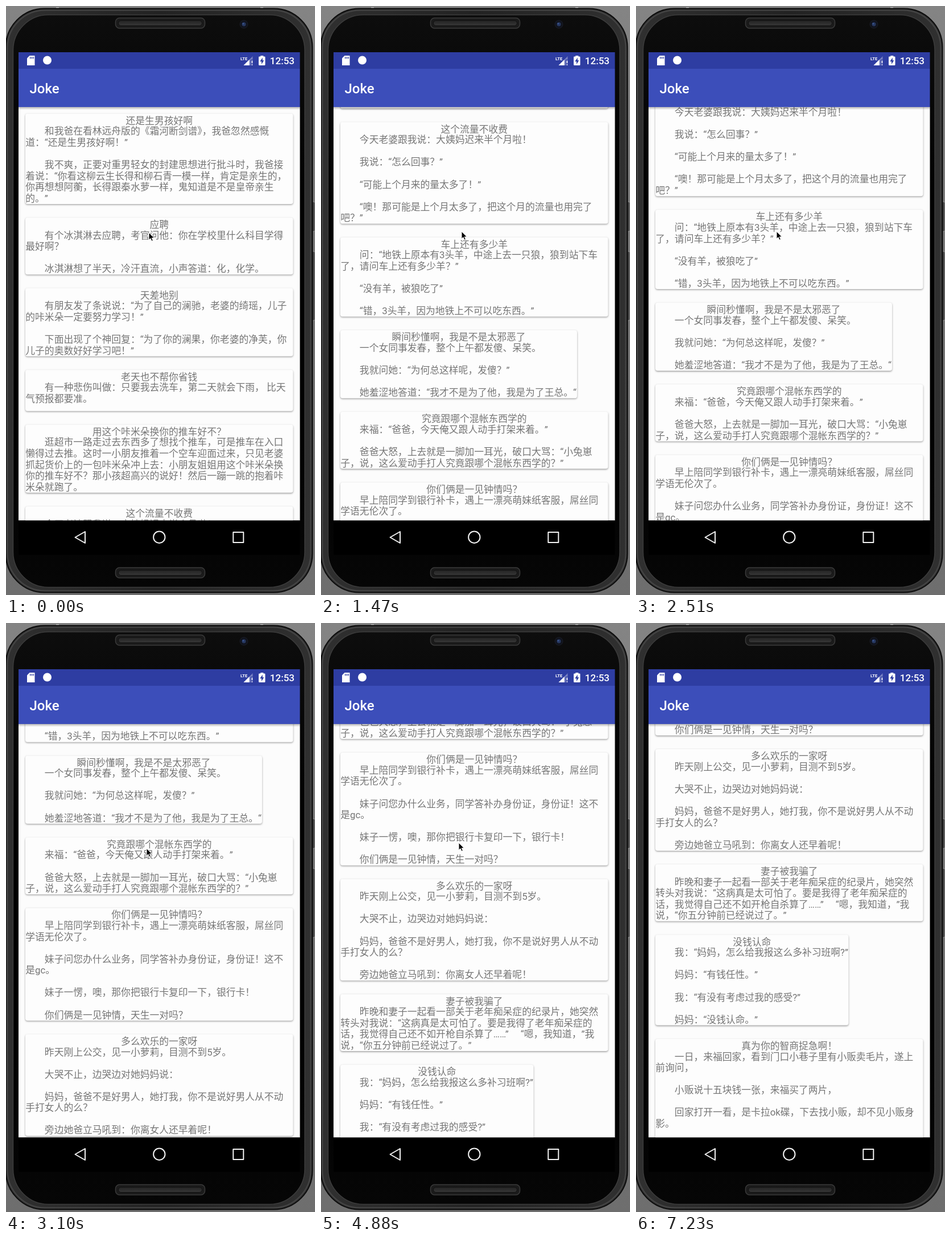
Recreate the animation shown at these times as an HTML page with a canvas. Size 543 by 1032 pixels, loop 7680 ms.

```html
<!DOCTYPE html>
<html lang="zh-CN">
<head>
<meta charset="utf-8">
<title>Joke</title>
<style>
html, body { margin: 0; width: 543px; height: 1032px; overflow: hidden; background: #7a7a7a; }
canvas { display: block; }
</style>
</head>
<body>
<canvas id="stage" width="543" height="1032"></canvas>
<script>
const ctx = document.getElementById('stage').getContext('2d');
const LOOP = 7680, STEP = 147.6;
const LINE = 19.57, CARD_PAD = 21.5, GAP = 23.8;
const LEFT = 34, FULL_WIDTH = 470.5, FIRST_TOP = 188.5;
const SANS = "Roboto, 'Noto Sans CJK SC', 'Noto Sans CJK', sans-serif";

// Each card: title line, then body lines.
const cards = [
`还是生男孩好啊
　　和我爸在看林远舟版的《霜河断剑谱》，我爸忽然感慨
道：“还是生男孩好啊！”

　　我不爽，正要对重男轻女的封建思想进行批斗时，我爸接
着说：“你看这柳云生长得和柳石青一模一样，肯定是亲生的，
你再想想阿蘅，长得跟秦水萝一样，鬼知道是不是皇帝亲生
的。”`,
`应聘
　　有个冰淇淋去应聘，考官问他：你在学校里什么科目学得
最好啊？

　　冰淇淋想了半天，冷汗直流，小声答道：化，化学。`,
`天差地别
　　有朋友发了条说说：“为了自己的澜驰，老婆的绮瑶，儿子
的咔米朵一定要努力学习！”

　　下面出现了个神回复：“为了你的澜果，你老婆的净芙，你
儿子的奥数好好学习吧！”`,
`老天也不帮你省钱
　　有一种悲伤叫做：只要我去洗车，第二天就会下雨， 比天
气预报都要准。`,
`用这个咔米朵换你的推车好不？
　　逛超市一路走过去东西多了想找个推车，可是推车在入口
懒得过去推。这时一小朋友推着一个空车迎面过来，只见老婆
抓起货价上的一包咔米朵冲上去：小朋友姐姐用这个咔米朵换
你的推车好不？那小孩超高兴的说好！然后一蹦一跳的抱着咔
米朵就跑了。`,
`这个流量不收费
　　今天老婆跟我说：大姨妈迟来半个月啦！

　　我说：“怎么回事？”

　　“可能上个月来的量太多了！”

　　“噢！那可能是上个月太多了，把这个月的流量也用完了
吧？”`,
`车上还有多少羊
　　问：“地铁上原本有3头羊，中途上去一只狼，狼到站下车
了，请问车上还有多少羊？”

　　“没有羊，被狼吃了”

　　“错，3头羊，因为地铁上不可以吃东西。”`,
`瞬间秒懂啊，我是不是太邪恶了
　　一个女同事发春，整个上午都发傻、呆笑。

　　我就问她：“为何总这样呢，发傻？”

　　她羞涩地答道：“我才不是为了他，我是为了王总。“`,
`究竟跟哪个混帐东西学的
　　来福：“爸爸，今天俺又跟人动手打架来着。”

　　爸爸大怒，上去就是一脚加一耳光，破口大骂：“小兔崽
子，说，这么爱动手打人究竟跟哪个混帐东西学的？”`,
`你们俩是一见钟情吗？
　　早上陪同学到银行补卡，遇上一漂亮萌妹纸客服，屌丝同
学语无伦次了。

　　妹子问您办什么业务，同学答补办身份证，身份证！这不
是gc。

　　妹子一愣，噢，那你把银行卡复印一下，银行卡！

　　你们俩是一见钟情，天生一对吗？`,
`多么欢乐的一家呀
　　昨天刚上公交，见一小萝莉，目测不到5岁。

　　大哭不止，边哭边对她妈妈说：

　　妈妈，爸爸不是好男人，她打我，你不是说好男人从不动
手打女人的么？

　　旁边她爸立马吼到：你离女人还早着呢！`,
`妻子被我骗了
　　昨晚和妻子一起看一部关于老年痴呆症的纪录片，她突然
转头对我说：“这病真是太可怕了。要是我得了老年痴呆症的
话，我觉得自己还不如开枪自杀算了……”　 “嗯，我知道，”我
说，“你五分钟前已经说过了。”`,
`没钱认命
　　我：“妈妈，怎么给我报这么多补习班啊?”

　　妈妈：“有钱任性。”

　　我：“有没有考虑过我的感受?”

　　妈妈：“没钱认命。”`,
`真为你的智商捉急啊！
　　一日，来福回家，看到门口小巷子里有小贩卖毛片，遂上
前询问，

　　小贩说十五块钱一张，来福买了两片，

　　回家打开一看，是卡拉ok碟，下去找小贩，却不见小贩身
影。

　　`
].map(text => {
  const [title, ...lines] = text.split('\n');
  return { title, lines, width: FULL_WIDTH, height: lines.length * LINE + CARD_PAD };
});
cards[3].height = 72.2;
cards[7].width = 416;
cards[12].width = 339.5;
cards.reduce((top, card) => (card.top = top) + card.height + GAP, FIRST_TOP);

// Flings: start step, end step, start offset, end offset, ease-out power.
const flings = [
  [0, 17, 0, 721.5, 3.05],
  [18, 34, 721.5, 1281, 3.47],
  [34, 42, 1281, 1436.5, 3],
  [42, 46, 1436.5, 1508.5, 2]
];

function scrollAt(step) {
  const [s0, s1, y0, y1, power] = flings.findLast(f => step >= f[0]);
  const p = Math.min(1, (step - s0) / (s1 - s0));
  return y0 + (y1 - y0) * (1 - (1 - p) ** power);
}

function cursorAt(step) {
  if (step < 1) return [251, 397];
  if (step < 30) return [247, 395];
  if (step < 45) return [242, 385];
  if (step === 45) return [533, 700];
  return step === 48 ? [519, 1030.5] : null;
}

function rect(x, y, w, h, color) {
  ctx.fillStyle = color;
  ctx.fillRect(x, y, w, h);
}

function round(x, y, w, h, r, fill, stroke, lineWidth = 1) {
  ctx.beginPath();
  ctx.roundRect(x, y, w, h, r);
  paint(fill, stroke, lineWidth);
}

function poly(points, fill, stroke, lineWidth) {
  ctx.beginPath();
  points.forEach(([x, y]) => ctx.lineTo(x, y));
  ctx.closePath();
  paint(fill, stroke, lineWidth);
}

function disc(x, y, r, fill, stroke, lineWidth) {
  ctx.beginPath();
  ctx.arc(x, y, r, 0, Math.PI * 2);
  paint(fill, stroke, lineWidth);
}

function paint(fill, stroke, lineWidth) {
  if (fill) { ctx.fillStyle = fill; ctx.fill(); }
  if (stroke) { ctx.strokeStyle = stroke; ctx.lineWidth = lineWidth; ctx.stroke(); }
}

function gradient(x0, y0, x1, y1, ...colors) {
  const g = ctx.createLinearGradient(x0, y0, x1, y1);
  colors.forEach((c, i) => g.addColorStop(i / (colors.length - 1), c));
  return g;
}

function label(text, x, y, font, color, align = 'left') {
  ctx.font = font;
  ctx.textAlign = align;
  ctx.fillStyle = color;
  ctx.fillText(text, x, y);
}

function drawSpeaker(y) {
  round(192.5, y, 157, 18, 7, '#1b1b1b', '#3a3a3a', 1.5);
  round(197.5, y + 4.5, 147, 9, 4.5, gradient(0, y + 4, 0, y + 14, '#222', '#383838'), '#101010');
}

function drawPhone() {
  rect(0, 0, 543, 1032, gradient(0, 0, 0, 1032, '#848484', '#787878', '#6e6e6e'));
  round(537, 343, 6, 52, 2, '#4a4a4a', '#a0a0a0');
  round(537, 430, 6, 121, 2, '#4a4a4a', '#a0a0a0');
  rect(88, 2, 5, 3, '#bbb');
  rect(447, 2, 5, 3, '#bbb');
  round(-0.5, 4.5, 539, 1023, 68, gradient(0, 0, 539, 0, '#303030', '#222', '#303030'), '#0c0c0c', 2);
  round(2.5, 7.5, 533, 1017, 66, null, '#454545', 2);
  round(12.5, 15.5, 512.5, 1003, 62, gradient(0, 15, 0, 1018, '#0d0d0d', '#000', '#000', '#060606'), '#3c3c3c', 1.5);
  drawSpeaker(21);
  drawSpeaker(984);
  disc(418, 32, 7, '#10131c', '#1b1e28', 1);
  disc(418, 32, 3.5, '#26375f');
  disc(416.8, 31, 1.3, '#3f5a94');
}

function drawCards(scroll) {
  ctx.save();
  ctx.beginPath();
  ctx.rect(22, 177, 494.5, 724.5);
  ctx.clip();
  rect(22, 177, 495, 725, '#fcfcfc');
  for (const { title, lines, width, height, top } of cards) {
    const y = top - scroll;
    if (y > 905 || y + height < 170) continue;
    ctx.save();
    ctx.shadowColor = 'rgba(0,0,0,.38)';
    ctx.shadowBlur = 3;
    ctx.shadowOffsetY = 1.3;
    round(LEFT, y, width, height, 4, '#fdfdfd');
    ctx.restore();
    const font = '16.8px ' + SANS;
    label(title, LEFT + width / 2, y + 18.3, font, '#757575', 'center');
    lines.forEach((line, i) => label(line, LEFT + 0.3, y + 36.9 + i * LINE, font, '#757575'));
  }
  rect(22, 177, 495, 5, gradient(0, 177, 0, 182, 'rgba(0,0,0,.28)', 'rgba(0,0,0,0)'));
  ctx.restore();
}

function drawBars() {
  const status = '#2e3da2', white = '#fff';
  rect(22, 81, 494.5, 29, status);
  rect(22, 110, 494.5, 67, '#3c4eba');
  label('Joke', 41.5, 152.5, '500 24px ' + SANS, white);
  label('12:53', 507, 102, '500 17px ' + SANS, white, 'right');
  label('LTE', 412, 95, 'bold 7.5px ' + SANS, white);

  poly([[41.5, 87], [50.5, 87], [50.5, 104], [37, 104], [37, 91.5]], white);
  [42, 44.8, 47.5].forEach(x => rect(x, 89, 1.3, 3.5, status));
  disc(72.5, 95, 7.5, white);

  poly([[417.5, 104], [433.5, 88], [433.5, 94], [430, 94], [430, 104]], 'rgba(255,255,255,.35)');
  poly([[417.5, 104], [427.5, 94], [427.5, 104]], white);
  rect(431.5, 95.5, 1.8, 5, white);
  rect(431.5, 102, 1.8, 1.8, white);

  round(444, 88.5, 11.5, 15.5, 1.2, white);
  rect(447.3, 87, 5, 2, white);
  poly([[450.8, 90.5], [446.2, 97.2], [449, 97.2], [449, 102], [453.4, 95.3], [450.8, 95.3]], status);

  rect(22, 901.5, 494.5, 60, '#000');
  ctx.lineJoin = 'round';
  poly([[121.5, 931], [139, 921], [139, 941]], null, '#f2f2f2', 2);
  disc(269.3, 930.7, 10.2, null, '#f2f2f2', 2);
  poly([[399.3, 922], [417.3, 922], [417.3, 940], [399.3, 940]], null, '#f2f2f2', 2);
}

function drawCursor([x, y]) {
  ctx.save();
  ctx.translate(x, y);
  ctx.lineJoin = 'miter';
  poly([[0, 0], [0, 13], [3, 10.3], [5, 15], [7.3, 14], [5.3, 9.5], [9.2, 9.3]], '#000', '#fff', 1);
  ctx.restore();
}

function draw(step) {
  drawPhone();
  drawCards(scrollAt(step));
  drawBars();
  const cursor = cursorAt(step);
  if (cursor) drawCursor(cursor);
}

const start = performance.now();
let shown = -1;

function tick() {
  const t = (performance.now() - start) % LOOP;
  const step = Math.min(49, Math.floor((t + 12) / STEP));
  if (step !== shown) draw(shown = step);
  requestAnimationFrame(tick);
}
tick();
</script>
</body>
</html>
```
